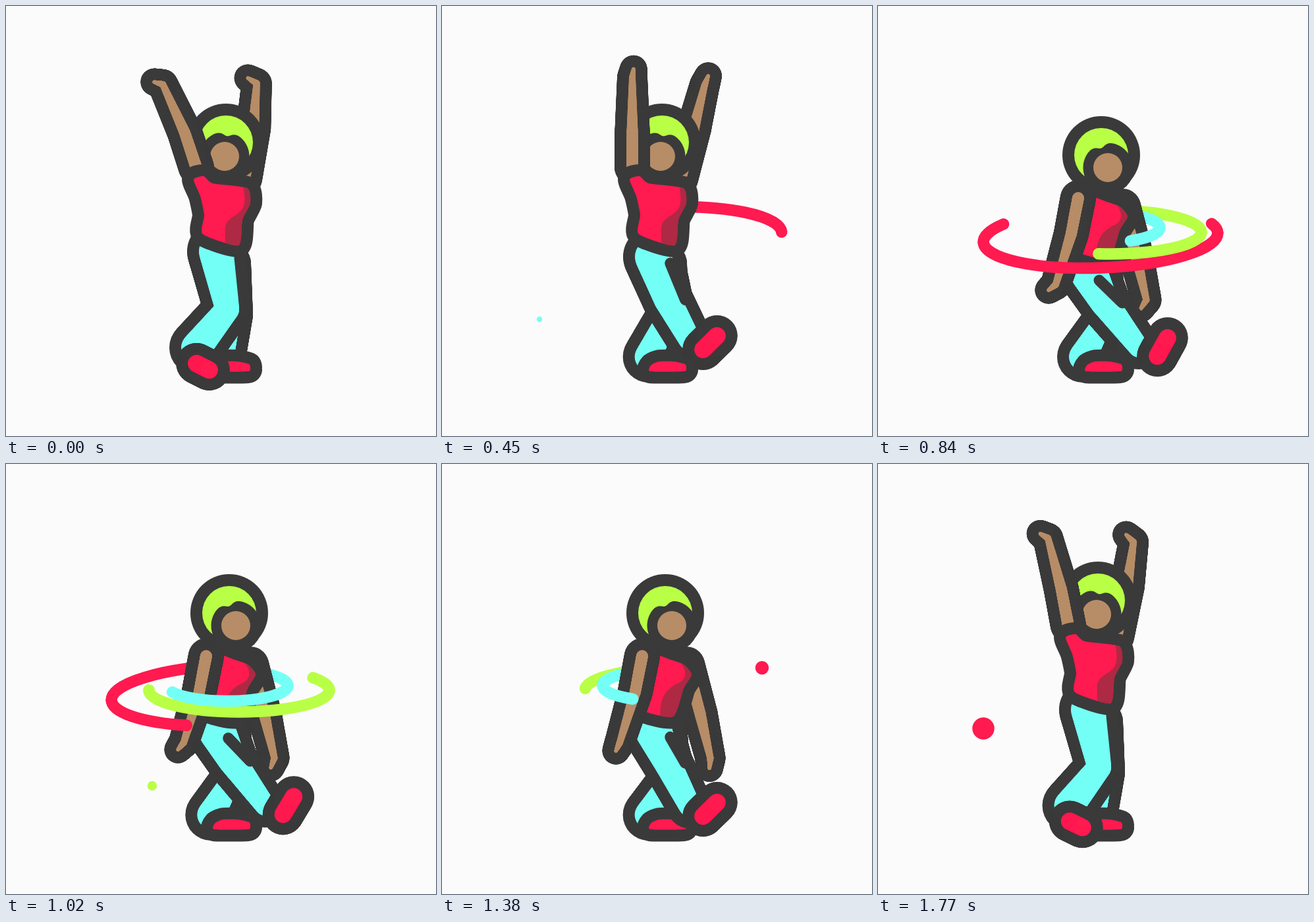
An HTML page with a canvas for the animation above (1800 ms loop, 653 by 652 pixels).

```html
<!DOCTYPE html>
<html lang="en">
<head>
<meta charset="utf-8">
<title>Dancer with hoops</title>
<style>
html, body { margin: 0; width: 100%; height: 100%; overflow: hidden; background: #fbfbfb; }
canvas { display: block; }
</style>
</head>
<body>
<canvas id="c" width="653" height="652"></canvas>
<script>
const ctx = document.getElementById('c').getContext('2d');
const LOOP = 1800, STEP = 600, INK = 18;
const DARK = '#3a3a3a', SKIN = '#b78d67', PINK = '#ff1a50', SHADE = '#ae2943',
  CYAN = '#74fff6', GREEN = '#b9ff45', PAPER = '#fbfbfb';

const mix = (a, b, k) => a + (b - a) * k;
const mixAll = (a, b, k) => a.map((v, i) => mix(v, b[i], k));
const part = (a, b, x) => Math.max(0, Math.min(1, (x - a) / (b - a)));
const smooth = (a, b, x) => {
  const k = part(a, b, x);
  return k * k * (3 - 2 * k);
};
const rad = deg => deg * Math.PI / 180;

function disc(x, y, r, color) {
  ctx.fillStyle = color;
  ctx.beginPath();
  ctx.arc(x, y, r, 0, Math.PI * 2);
  ctx.fill();
}
function line(a, b, width, color) {
  ctx.strokeStyle = color;
  ctx.lineWidth = width;
  ctx.beginPath();
  ctx.moveTo(...a);
  ctx.lineTo(...b);
  ctx.stroke();
}
// Tapered chain of joints, each [x, y, radius], with a dark rim.
function limb(joints, color) {
  for (const [grow, fill] of [[INK, DARK], [0, color]]) {
    for (let i = 1; i < joints.length; i++) {
      for (let k = 0; k <= 1; k += 1 / 64) {
        const [x, y, r] = mixAll(joints[i - 1], joints[i], k);
        disc(x, y, r + grow, fill);
      }
    }
  }
}
// Softly rounded closed path through x, y pairs.
function curve(p, s = 0.1) {
  const n = p.length / 2;
  const at = i => [p[(i + n) % n * 2], p[(i + n) % n * 2 + 1]];
  const path = new Path2D();
  path.moveTo(p[0], p[1]);
  for (let i = 0; i < n; i++) {
    const [a, b, c, d] = [at(i - 1), at(i), at(i + 1), at(i + 2)];
    path.bezierCurveTo(b[0] + (c[0] - a[0]) * s, b[1] + (c[1] - a[1]) * s,
      c[0] - (d[0] - b[0]) * s, c[1] - (d[1] - b[1]) * s, c[0], c[1]);
  }
  path.closePath();
  return path;
}
function inked(path, fill) {
  ctx.strokeStyle = DARK;
  ctx.lineWidth = INK * 2;
  ctx.stroke(path);
  ctx.fillStyle = fill;
  ctx.fill(path);
}

// beat: 1 feet together, -1 full kick; kick and low run from 0 to 1.
function poseAt(t) {
  const beat = Math.cos(2 * Math.PI * (t - 15) / STEP);
  const low = smooth(665, 835, t) - smooth(1440, 1740, t);
  return {
    beat, low,
    kick: smooth(0, 0.8, (1 - beat) / 2),
    swing: mix(-26 * beat ** 5, 48 * Math.max(0, beat), low),
    curl: mix(-50, 50, low) * beat
  };
}

// Angles turn clockwise from straight up; side is -1 left, 1 right.
const arms = {
  left: { side: -1, from: [289, 245], to: [304, 291], lengths: [56, 80, 14],
    up: [0, 0, 0], down: [-169, -163, -163], follow: [0.75, 1, 1] },
  right: { side: 1, from: [362, 262], to: [372, 304], lengths: [78, 68, 16],
    up: [15, 14, 13], down: [165, 167, 177], follow: [0.2, 0.4, 0.9] }
};
function arm(a, p) {
  const radii = [8.5, 5, 2.5];
  let [x, y] = mixAll(a.from, a.to, p.low);
  const joints = [[x, y, 9]];
  const flip = mix(1, -1, p.low);
  a.lengths.forEach((len, i) => {
    const lag = i ? p.low ** 2 : p.low;
    const bend = (a.follow[i] * p.swing + (i === 2 ? p.curl : 0)) * flip;
    const angle = rad(mix(a.up[i], a.down[i], lag) + bend);
    x += len * Math.sin(angle);
    y -= len * Math.cos(angle);
    joints.push([x, y, radii[i]]);
  });
  limb(joints, SKIN);
}

const flatShoe = curve([316,554, 318,544, 330,539, 352,539, 369,543, 371,549, 367,554]);
function legs({ low, kick }) {
  const high = 1 - low;
  limb([[340, 390 + 12 * low, 14],
    [343 + 22 * low * (1 - kick), 468 + 8 * low, 14],
    [mix(325, 311, kick), 532, 21]], CYAN);
  inked(flatShoe, PINK);

  const hip = [321, 372 + 24 * low + 10 * kick, 28];
  const knee = [336 + 8 * kick, 460 + 8 * low - 18 * kick, 18 + 3 * kick];
  const ankle = [289 + 107 * kick, 518 - 15 * kick * high, 23 - 8 * kick];
  limb([hip, knee, ankle], CYAN);
  line([hip[0] + 34 - 19 * kick ** 4, hip[1] + 10], [knee[0] + 27, knee[1]], 17, DARK);

  const x = 299 + 133 * kick, y = 547 + 5 * low - (35 + 10 * high) * kick;
  const turn = rad(27 - 88 * kick), half = 11 + 5 * kick;
  const dx = half * Math.cos(turn), dy = half * Math.sin(turn);
  limb([[x - dx, y - dy, 13], [x + dx, y + dy, 13]], PINK);
}

function head({ low }) {
  const x = 334 + 5 * low, y = 207 + 19 * low;
  const fx = x + mix(-2, 10, low), fy = y + mix(21, 19, low);
  disc(x, y, 59, DARK);
  disc(fx, fy, 40, DARK);
  disc(x, y, 41, GREEN);
  // Hairline: a ring round the face with one dip.
  const dip = mix(-1.45, -1.9, low);
  ctx.fillStyle = DARK;
  ctx.beginPath();
  for (let a = -Math.PI; a < Math.PI; a += 0.05) {
    const r = 37.5 - 6.5 * Math.exp(-(((a - dip) / 0.25) ** 2));
    ctx.lineTo(fx + r * Math.cos(a), fy + r * Math.sin(a));
  }
  ctx.fill();
  disc(fx, fy, 22, SKIN);
}

// Shoulder, neck, bust, waist, hem, then up the other side.
const shirtUp = [285,263, 300,258, 314,269, 366,276, 371,299, 359,324, 353,363, 299,346, 301,317, 295,288];
const shirtLow = [310,292, 328,290, 345,296, 367,304, 379,319, 367,340, 351,383, 304,373, 307,343, 307,312];
function shirt({ low }) {
  const p = mixAll(shirtUp, shirtLow, low);
  const body = curve(p);
  inked(body, PINK);
  const [nx, ny, bx, by, wx, wy, hx, hy] = p.slice(6, 14);
  ctx.save();
  ctx.clip(body);
  ctx.fillStyle = SHADE;
  ctx.beginPath();
  ctx.moveTo(nx - 6, ny - 4);
  ctx.bezierCurveTo(bx - 8, by - 8, bx - 4, by + 8, wx - 12, wy - 6);
  ctx.bezierCurveTo(wx - 32, wy + 6, hx - 19, hy - 24, hx - 20, hy);
  ctx.lineTo(hx + 40, hy + 10);
  ctx.lineTo(nx + 40, ny - 4);
  ctx.fill();
  ctx.restore();
}

function dancer(p) {
  arm(arms.right, p);
  legs(p);
  head(p);
  const over = p.low > 0.5;
  if (!over) arm(arms.left, p);
  shirt(p);
  if (over) arm(arms.left, p);
}

// Each ribbon runs from behind (-90) right round to behind (270).
// lead and tail give start and end times; ease 2 slows the lead down.
const hoops = [
  { color: PINK, shape: [338, 351, 178, 46, -0.04], lead: [290, 940], tail: [740, 1240], ease: 1 },
  { color: GREEN, shape: [354, 343, 137, 33, 0], lead: [430, 1215], tail: [930, 1520], ease: 1 },
  { color: CYAN, shape: [336, 336, 92, 23.5, 0], lead: [630, 1526], tail: [1063, 1606], ease: 2 }
];
function ribbons(t, spans) {
  for (const { color, shape, lead, tail, ease } of hoops) {
    const to = 270 - 360 * (1 - part(...lead, t)) ** ease;
    const from = -90 + 360 * part(...tail, t);
    ctx.strokeStyle = color;
    ctx.lineWidth = 17.5;
    for (const [lo, hi] of spans) {
      const a = Math.max(lo, from), b = Math.min(hi, to);
      if (a >= b) continue;
      ctx.beginPath();
      ctx.ellipse(...shape, rad(a), rad(b));
      ctx.stroke();
    }
  }
}

// x, y, radius, colour, start time
const dots = [
  [122, 250, 20, GREEN, 80], [536, 430, 20, CYAN, 140],
  [154, 149, 19.5, CYAN, 520], [148, 475, 13, CYAN, 435],
  [222, 488, 18.5, GREEN, 1000], [486, 309, 20, PINK, 1348],
  [160, 401, 20, PINK, 1690]
];
function pops(t) {
  for (const [x, y, r, color, start] of dots) {
    const k = part(start, start + 300, t);
    if (k > 0 && k < 1) disc(x, y, r * Math.sin(Math.PI * k) ** 0.6, color);
  }
}

function draw(t) {
  ctx.fillStyle = PAPER;
  ctx.fillRect(0, 0, 653, 652);
  ctx.lineCap = ctx.lineJoin = 'round';
  pops(t);
  ribbons(t, [[-90, 0], [180, 270]]);
  dancer(poseAt(t));
  ribbons(t, [[0, 180]]);
}

let begin;
function tick(now) {
  begin ??= now;
  draw((now - begin) % LOOP);
  requestAnimationFrame(tick);
}
draw(0);
requestAnimationFrame(tick);
</script>
</body>
</html>
```
